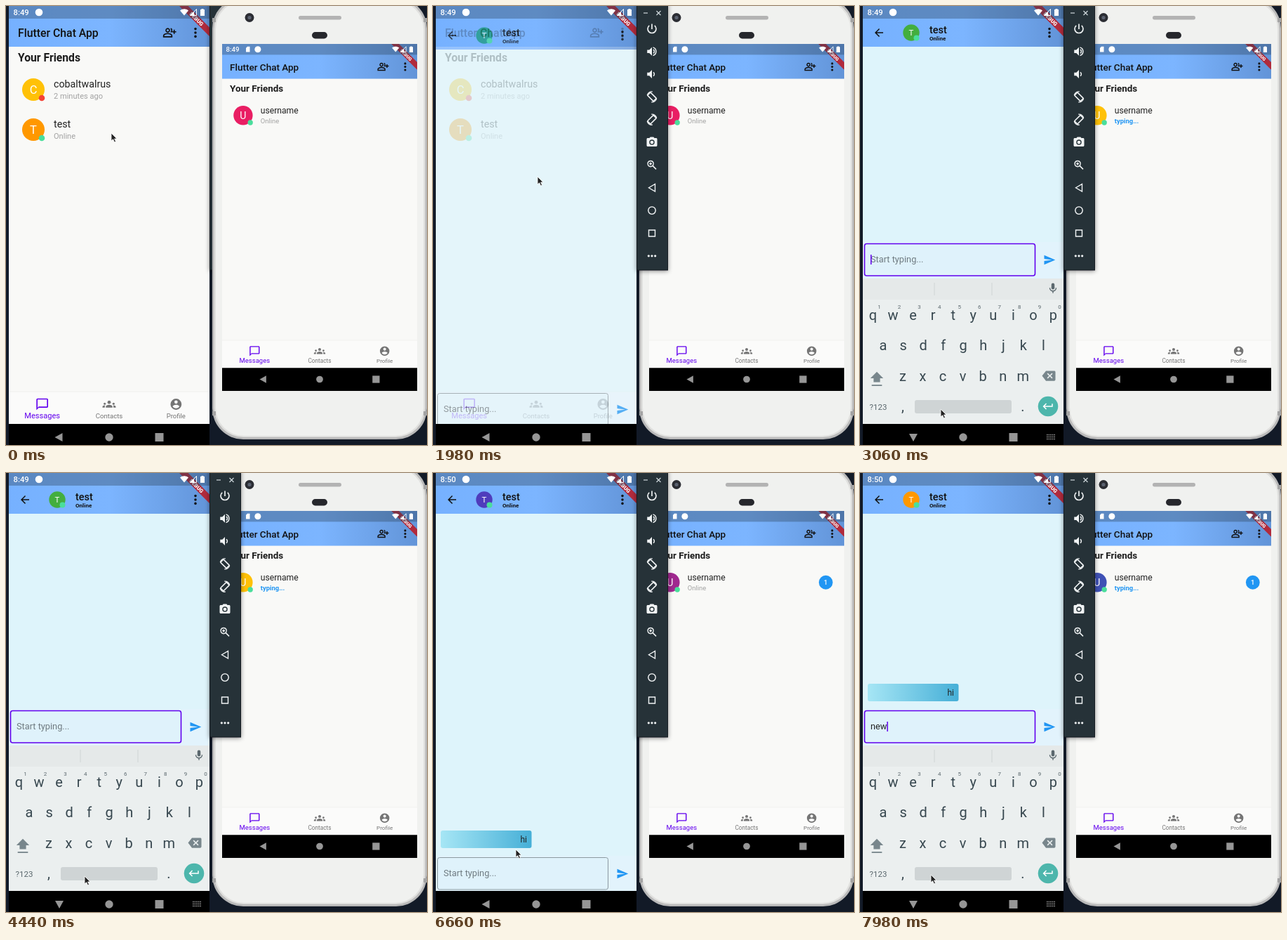
Recreate the animation shown at these times as an HTML page. Size 600 px wide and 625 px high, loop 8000 ms.

```html
<!DOCTYPE html>
<html lang="en">
<head>
<meta charset="utf-8">
<title>Chat app on two phones</title>
<style>
  html, body { margin: 0; width: 100%; height: 100%; overflow: hidden; background: #121a27; }
  #stage { display: block; width: 600px; height: 625px; font-family: Roboto, sans-serif; }
</style>
</head>
<body>
<svg id="stage" viewBox="0 0 600 625"></svg>
<script>
const LOOP = 8000;
const PURPLE = '#6200ee', BLUE = '#2196f3';

const line = (d, w = 2, extra = '') =>
  `<path d="${d}" fill="none" stroke="currentColor" stroke-width="${w}" ${extra}/>`;
const solid = d => `<path d="${d}" fill="currentColor" fill-rule="evenodd"/>`;
const dot = (x, y, r, fill = 'currentColor', extra = '') =>
  `<circle cx="${x}" cy="${y}" r="${r}" fill="${fill}" ${extra}/>`;
const rect = (x, y, w, h, fill, extra = '') =>
  `<rect x="${x}" y="${y}" width="${w}" height="${h}" fill="${fill}" ${extra}/>`;
const text = (x, y, size, str, extra = '') =>
  `<text x="${x}" y="${y}" font-size="${size}" ${extra}>${str}</text>`;
const MID = 'text-anchor="middle"';

// Icons live in a 24 x 24 box.
const tilted = '<rect x="8" y="4" width="8" height="16" rx="1" fill="none" stroke="currentColor" stroke-width="2.2" transform="rotate(-45 12 12)"/>'
  + line('M3 9A10 10 0 0 1 13 2M21 15A10 10 0 0 1 11 22', 1.8);
const speaker = 'M3 9v6h4l5 5V4L7 9z';
const ICONS = {
  chat: solid('M20 2H4c-1.1 0-2 .9-2 2v18l4-4h14c1.1 0 2-.9 2-2V4c0-1.1-.9-2-2-2zm0 14H6l-2 2V4h16z'),
  people: dot(12, 8.5, 3) + dot(4, 11, 2) + dot(20, 11, 2)
    + solid('M6 18v-1.6c0-2 3-3.4 6-3.4s6 1.4 6 3.4V18zM0 18v-1.6c0-1.4 2-2.5 4.9-2.4-.6.7-.7 1.5-.7 4zM24 18v-1.6c0-1.4-2-2.5-4.9-2.4.6.7.7 1.5.7 4z'),
  account: solid('M12 2a10 10 0 1 0 0 20 10 10 0 0 0 0-20zm0 3a3 3 0 1 1 0 6 3 3 0 0 1 0-6zm0 14.2c-2.5 0-4.7-1.3-6-3.2 0-2 4-3.1 6-3.1s6 1.1 6 3.1c-1.3 1.9-3.5 3.2-6 3.2z'),
  addPerson: line('M9 5a3 3 0 1 0 .01 0M2 19v-2c0-2 4-3.5 7-3.5s7 1.5 7 3.5v2zM14 5c2.6.6 2.6 5.4 0 6M20 7v7M16.5 10.5h7'),
  more: dot(12, 5, 2.3) + dot(12, 12, 2.3) + dot(12, 19, 2.3),
  dots: dot(5, 12, 2.4) + dot(12, 12, 2.4) + dot(19, 12, 2.4),
  back: solid('M20 11H7.8l5.6-5.6L12 4l-8 8 8 8 1.4-1.4L7.8 13H20z'),
  send: solid('M2 21L23 12 2 3v7l15 2-15 2z'),
  power: line('M12 3v10M7 6a8 8 0 1 0 10 0', 2.2),
  volUp: solid(speaker) + line('M14.5 8.5a4 4 0 0 1 0 7M14 4.3a8 8 0 0 1 0 15.4'),
  volDown: solid(speaker) + line('M14.5 8.5a4 4 0 0 1 0 7'),
  rotLeft: tilted,
  rotRight: `<g transform="matrix(-1 0 0 1 24 0)">${tilted}</g>`,
  camera: solid('M9 2L7.2 4H4c-1.1 0-2 .9-2 2v12c0 1.1.9 2 2 2h16c1.1 0 2-.9 2-2V6c0-1.1-.9-2-2-2h-3.2L15 2zm3 5a5 5 0 1 1 0 10 5 5 0 0 1 0-10z') + dot(12, 12, 3.2),
  zoom: line('M9.5 4a5.5 5.5 0 1 0 .01 0M14 14l6 6M9.5 7v5M7 9.5h5'),
  triangle: line('M18 5v14L6 12z', 1.8),
  ring: line('M12 5a7 7 0 1 0 .01 0z', 1.9),
  box: line('M6 6h12v12H6z', 1.9),
  mic: solid('M12 14a3 3 0 0 0 3-3V5a3 3 0 0 0-6 0v6a3 3 0 0 0 3 3z') + line('M6 11a6 6 0 0 0 12 0M12 17v4', 1.9),
  erase: solid('M22 3H7L0 12l7 9h15c1.1 0 2-.9 2-2V5c0-1.1-.9-2-2-2zm-3 12.6L17.6 17 14 13.4 10.4 17 9 15.6 12.6 12 9 8.4 10.4 7 14 10.6 17.6 7 19 8.4 15.4 12z'),
  enter: solid('M19 7v4H5.8l3.6-3.6L8 6l-6 6 6 6 1.4-1.4L5.8 13H21V7z'),
  shift: solid('M12 2L2 12h5v6h10v-6h5z') + line('M4 23h16'),
  wifi: solid('M12 21L0 7C7 1 17 1 24 7z'),
  signal: line('M3 21L21 3v18z') + solid('M3 21L14 10v11z'),
  battery: solid('M9 2h6v2h3v18H6V4h3z'),
  card: solid('M10 2h9v20H5V7z'),
};
const icon = (name, x, y, size, color) =>
  `<g color="${color}" transform="translate(${x - size / 2} ${y - size / 2}) scale(${size / 24})">${ICONS[name]}</g>`;

const appBar = w => rect(0, 0, w, 58, 'url(#bar)') + icon('more', w - 20, 38, 18.5, '#111');

const banner = w => `<g transform="translate(${w} 0) rotate(45)">`
  + rect(-30, 21.5, 60, 9, '#b02a3c') + text(0, 28.8, 7.6, 'DEBUG', `${MID} fill="#fff" font-weight="900"`) + '</g>';

// The system draws its status row above the app, so it also covers the banner.
const statusRow = (w, card) => rect(0, 0, w, 18, '#2c4058', 'opacity=".36"')
  + text(6.5, 13, 11.3, '8:49', 'fill="#fff" font-weight="500" class="clock"')
  + (card ? icon('card', 43, 9, 11, '#fff') : '') + dot(card ? 59.5 : 43, 9, 5.3, '#fff')
  + icon('wifi', w - 36, 9, 12, '#fff') + icon('signal', w - 23, 9, 12, '#fff')
  + icon('battery', w - 10, 9, 12, '#fff');

function friend(row, name, sub, color, online, id = '') {
  const y = 119 + 57 * row;
  return `<g id="${id}">` + dot(35, y, 16, color, 'class="face"')
    + text(35, y + 5.8, 16.5, name[0].toUpperCase(), `${MID} fill="#fff"`)
    + dot(47, y + 12, 4.3, online ? '#4ade9c' : '#f44336')
    + text(64, y - 3, 14.25, name, 'fill="#222"')
    + text(64, y + 13, 11.05, sub, 'fill="#a2a2a2" class="sub"') + '</g>';
}

function friendsPage(w, bottom, rows) {
  const tab = (i, name, glyph, size, color) => icon(glyph, w * (i + .5) / 3, bottom - 28, i ? 19 : 20, color)
    + text(w * (i + .5) / 3, bottom - 8.5, size, name, `${MID} fill="${color}"`);
  return rect(0, 0, w, bottom, '#f9f9f7') + appBar(w)
    + text(13, 44.3, 15.8, 'Flutter Chat App', 'font-weight="500" fill="#111"')
    + icon('addPerson', w - 57, 38, 20, '#111')
    + text(13, 79, 15.7, 'Your Friends', 'font-weight="700" fill="#1c1c1c"')
    + rows + rect(0, bottom - 46, w, 46, '#fbfbfa') + rect(0, bottom - 46.5, w, 1, '#efefed')
    + tab(0, 'Messages', 'chat', 11.1, PURPLE) + tab(1, 'Contacts', 'people', 9.65, '#757575')
    + tab(2, 'Profile', 'account', 9.5, '#757575');
}

const systemBar = (w, y, spread) => {
  const c = w / 2;
  return rect(0, y, w, 40, '#000')
    + `<path class="goBack" d="M5 -6V6L-6 0z" fill="#969696" transform="translate(${c - spread} ${y + 19})"/>`
    + dot(c, y + 19, 5.7, '#969696') + rect(c + spread - 6, y + 13, 12, 12, '#969696');
};

function keyboard() {
  const ink = 'fill="#37474f"';
  const row = (keys, x, y) => [...keys].map((k, i) => text(x + 28.55 * i, y, 20, k, `${MID} ${ink}`)).join('');
  const hint = (x, str, extra = '') => text(x, 409, 14.5, str, `${MID} fill="#66757c" ${extra}`);
  return rect(4, 388, 286, 207, '#ebefef') + rect(4, 388, 286, 30, '#e5e9e9')
    + rect(105.5, 394, 1, 18, '#cfd5d6') + rect(187.5, 394, 1, 18, '#cfd5d6')
    + icon('mic', 275, 402, 18, '#5b686e')
    + `<g id="hints">${hint(69, 'Hi')}${hint(147, 'hi', 'font-weight="700"')}${hint(225, 'his')}${icon('dots', 147, 416, 15, '#455a64')}</g>`
    + row('qwertyuiop', 18.5, 447) + row('asdfghjkl', 33, 490) + row('zxcvbnm', 61, 533.5)
    + [...'1234567890'].map((n, i) => text(27.5 + 28.55 * i, 430.5, 8, n, `${MID} fill="#5a676d"`)).join('')
    + icon('shift', 24, 530, 22, '#78868c') + icon('erase', 269, 526.5, 19, '#78868c')
    + text(26, 574.5, 11.5, '?123', `${MID} fill="#5a676d"`)
    + text(61, 577, 20, ',', `${MID} ${ink}`) + text(232, 577, 20, '.', `${MID} ${ink}`)
    + rect(78, 561, 138, 19, '#cfd4d5', 'rx="3"') + dot(268, 570, 14.3, '#4db6ac') + icon('enter', 268, 570, 18, '#fff');
}

const chatPage = rect(0, 0, 286, 625, '#def4fb') + appBar(286) + '<g transform="translate(-4 0)">'
  + icon('back', 27, 38, 18, '#111') + dot(73, 38, 11.7, '#009688', 'id="peer"')
  + text(73, 42, 11.5, 'T', `${MID} fill="#fff"`) + dot(80.5, 45.5, 4, '#4ade9c')
  + text(99, 39, 14.5, 'test', 'font-weight="500" fill="#111"') + text(99, 49, 8.1, 'Online', 'font-weight="700" fill="#111"')
  + '<g id="composer"><g id="bubble">' + rect(11, 509, 129.5, 25, 'url(#bubbleFill)', 'rx="3"') + text(124.5, 525.5, 12, 'hi', 'fill="#222"') + '</g>'
  + rect(4, 545, 286, 52, '#e2f3fc')
  + rect(6.5, 547.5, 243, 45.5, '#dff2fb', 'rx="3" id="field"')
  + text(15, 574, 12.75, '', 'id="draft"') + rect(15, 563, 1.5, 14, PURPLE, 'id="caret"')
  + rect(15, 575.5, 11, 1, '#333', 'id="underline"') + icon('send', 270, 570.5, 18, BLUE) + '</g>'
  + `<g id="keyboard">${keyboard()}</g></g>`;

const leftPhone = '<svg x="4" width="286" height="625">'
  + friendsPage(286, 595, friend(0, 'cobaltwalrus', '2 minutes ago', '#ffc107', false) + friend(1, 'test', 'Online', '#ff9800', true))
  + `<g id="chat">${chatPage}</g>` + systemBar(286, 595, 71.5)
  + '<g id="keysIcon">' + [0, 1, 2].map(r => `<path d="M262 ${610.5 + 3 * r}h12" stroke="#969696" stroke-width="1.6" stroke-dasharray="1.6 1"/>`).join('') + '</g>'
  + banner(286) + statusRow(286, false) + '</svg>';

const badge = '<g id="badge">' + dot(294.5, 119, 11.6, BLUE) + text(294.5, 123, 11, '1', `${MID} fill="#fff" font-weight="500"`) + '</g>';
const rightPhone = '<g id="rightPhone">'
  + rect(294, -12, 306, 629, '#b9b9b9', 'rx="44"') + rect(296.5, -9, 301, 623, '#e0e0de', 'rx="42"') + rect(299, -7, 296, 619, '#f0f1ef', 'rx="40"')
  + [17, 577].map(y => rect(294, y, 5, 6, '#a4a4a4') + rect(595, y, 5, 6, '#a4a4a4')).join('')
  + dot(347, 16.5, 6.5, '#2b2d33') + dot(347, 16.5, 2.6, '#5b6270')
  + rect(417, 14, 61, 5.5, '#b3b3b3', 'rx="2.7"') + rect(436, 37, 22, 9.5, '#26272c', 'rx="4.7"')
  + '<svg x="308" y="54" width="278" height="494" viewBox="0 0 325.15 577.8" preserveAspectRatio="none">'
  + friendsPage(325.15, 539.5, friend(0, 'username', 'Online', '#e91e63', true, 'user') + badge)
  + systemBar(325.15, 539.5, 94) + banner(325.15) + statusRow(325.15, true) + '</svg></g>';

const tools = ['power', 'volUp', 'volDown', 'rotLeft', 'rotRight', 'camera', 'zoom', 'triangle', 'ring', 'box', 'dots'];
const toolbar = '<g id="toolbar">' + rect(290.5, -4, 44, 380, '#263238', 'stroke="#151d21" filter="url(#shade)"')
  + line('M300 10h6', 1.2, 'color="#cfd8dc"') + line('M318.5 7l6 6m0-6l-6 6', 1.2, 'color="#cfd8dc"')
  + tools.map((name, i) => icon(name, 312, 32.3 + 32.35 * i, i === 10 ? 16 : 18, '#f1f4f5')).join('') + '</g>';

const gradient = (id, ...colors) => `<linearGradient id="${id}">`
  + colors.map((c, i) => `<stop offset="${i / (colors.length - 1)}" stop-color="${c}"/>`).join('') + '</linearGradient>';
const stage = document.getElementById('stage');
stage.innerHTML = '<defs>' + gradient('bar', '#76b1ff', '#7cb5ff', '#6294d8') + gradient('bubbleFill', '#a6e6f5', '#46afd7')
  + '<filter id="shade" x="-30%" width="160%"><feDropShadow dx="0" dy="1" stdDeviation="3" flood-opacity=".45"/></filter></defs>'
  + rect(0, 0, 600, 625, '#121a27') + leftPhone + toolbar + rightPhone
  + '<path id="cursor" d="M0 0V11L2.6 8.7L4.6 13L6.5 12.1L4.6 8H8z" fill="#222" stroke="#fff" stroke-width=".8"/>';

// Timelines: [ms, value]
const pointer = [[0, 150, 181], [120, 150, 181], [700, 395, 150], [1000, 415, 152], [1440, 404, 156], [1500, 390, 158],
  [1680, 152, 174], [1850, 152, 174], [2280, 139, 484], [2500, 122, 560], [2700, 115, 574], [4440, 112, 574],
  [5050, 112, 573], [5500, 200, 450], [5880, 259, 365], [6050, 261, 365], [6660, 118, 536], [6850, 103, 571], [8000, 101, 572]];
const draft = [[0, ''], [2900, ''], [4700, 'h'], [4950, 'hi'], [5980, ''], [7000, ''], [7640, 'n'], [7760, 'ne'], [7900, 'new']];
const peerColor = [[0, '#1c9a80'], [2950, '#43ae3f'], [6150, '#4f3cbc'], [7050, '#ff9800']];
const userColor = [[0, '#e91e63'], [3050, '#ffc107'], [6150, '#a0288f'], [7100, '#3f51b5']];
const lift = [[0, 0], [2780, 0], [2960, 1], [6060, 1], [6240, 0], [6880, 0], [7060, 1], [LOOP, 1]];

const step = (table, t) => table.filter(k => k[0] <= t).pop();
const between = (t, a, b) => t >= a && t < b;
const smooth = p => p * p * (3 - 2 * p);
function ease(table, t) {
  const i = Math.max(1, table.findIndex(k => k[0] > t));
  const a = table[i - 1], b = table[i], p = smooth((t - a[0]) / (b[0] - a[0]));
  return a.slice(1).map((v, n) => v + (b[n + 1] - v) * p);
}

const $ = id => document.getElementById(id);
const set = (el, attrs) => { for (const k in attrs) el.setAttribute(k, attrs[k]); };
const show = (id, on) => { $(id).style.display = on ? '' : 'none'; };
const leftClock = stage.querySelector('.clock');
const leftBack = stage.querySelector('.goBack');
const userFace = $('user').querySelector('.face'), userSub = $('user').querySelector('.sub');
const cursor = $('cursor');

function render(t) {
  const [x, y] = ease(pointer, t), [up] = ease(lift, t);
  set(cursor, { transform: `translate(${Math.round(x)} ${Math.round(y)})` });

  const front = t >= 1760 ? $('toolbar') : $('rightPhone');
  if (front.nextElementSibling !== cursor) stage.insertBefore(front, cursor);

  const opened = Math.min(1, Math.max(0, (t - 1860) / 160));
  show('chat', opened > 0);
  set($('chat'), { opacity: opened, transform: `translate(0 ${Math.round(30 * (1 - smooth(opened)))})` });
  leftClock.textContent = t < 5400 ? '8:49' : '8:50';

  set($('composer'), { transform: `translate(0 ${-209 * up})` });
  set($('keyboard'), { transform: `translate(0 ${207 * (1 - up)})` });
  show('keyboard', up > 0);
  show('keysIcon', up > 0);
  set(leftBack, { transform: `translate(${up > 0 ? 72 : 71.5} 614)${up > 0 ? ' rotate(-90)' : ''}` });

  const focused = up > 0 && !between(t, 6060, 6800);
  const [since, words] = step(draft, t);
  set($('field'), { stroke: focused ? PURPLE : '#8b999f', 'stroke-width': focused ? 1.6 : 1 });
  $('draft').textContent = words || 'Start typing...';
  set($('draft'), { fill: words ? '#222' : '#6f7b81' });
  set($('caret'), { x: 15 + (words ? $('draft').getComputedTextLength() : 0) });
  show('caret', focused && Math.floor((t - since) / 500) % 2 === 0);
  const composing = between(t, 4700, 5980);
  show('underline', composing);
  set($('underline'), { width: words === 'hi' ? 10.5 : 7 });
  show('hints', composing);
  show('bubble', t >= 6040);

  const typing = between(t, 3050, 6150) || t >= 7100;
  userSub.textContent = typing ? 'typing...' : 'Online';
  set(userSub, { fill: typing ? BLUE : '#a2a2a2', 'font-weight': typing ? 700 : 400 });
  set(userFace, { fill: step(userColor, t)[1] });
  set($('peer'), { fill: step(peerColor, t)[1] });
  show('badge', t >= 6150);
}

const start = performance.now();
function tick() {
  render((performance.now() - start) % LOOP);
  requestAnimationFrame(tick);
}
tick();
</script>
</body>
</html>
```
